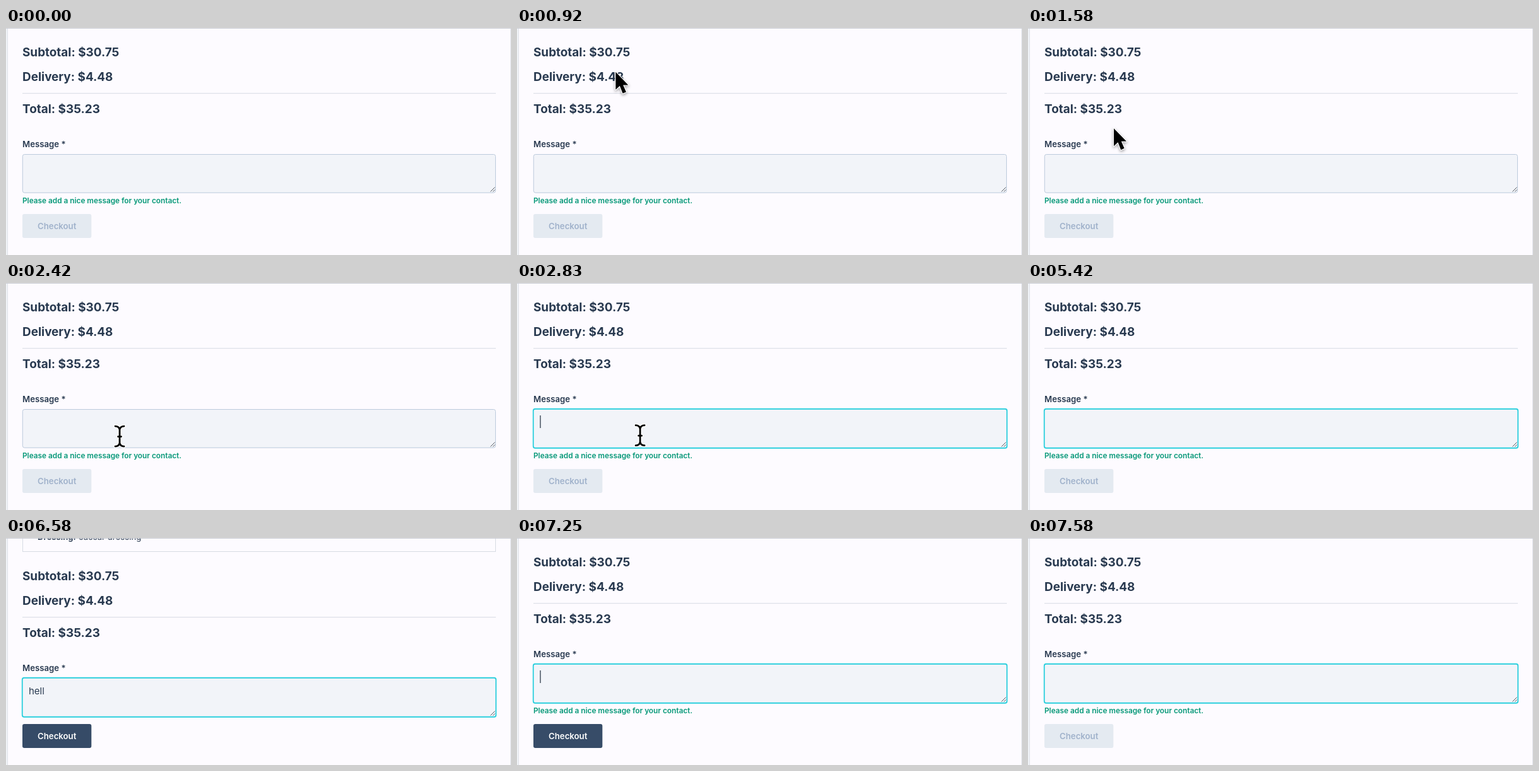
These frames come from a looping animation (800x360 px, 8000 ms). An HTML page:

```html
<!DOCTYPE html>
<html lang="en">
<head>
<meta charset="utf-8">
<title>Checkout form</title>
<style>
html, body { margin: 0; width: 100%; height: 100%; overflow: hidden; background: #fdfbff; }
svg { display: block; width: 800px; height: 360px; font-family: Inter, "Open Sans", sans-serif; }
text { fill: #293a50; font-weight: 600; font-size: 13.2px; }
.sum { font-size: 18.9px; font-weight: 700; }
.plain { font-weight: 400; }
.hint { font-size: 11.8px; fill: #069878; }
#typed { font-size: 15px; font-weight: 400; }
.line { stroke: #d7dbe3; fill: none; }
#ibeam path { fill: none; stroke: #000; stroke-width: 2.8; stroke-linecap: round; stroke-linejoin: round; }
#ibeam .halo { stroke: #fff; stroke-width: 5.4; }
#pointer { filter: drop-shadow(0 2px 2px rgba(0, 0, 0, .35)); }
</style>
</head>
<body>
<svg viewBox="0 0 800 360">
  <rect width="800" height="360" fill="#fdfbff"/>
  <rect width="2" height="360" fill="#f0f3f7"/>
  <path class="line" d="M2.5 0V360M799.5 0V360" stroke-opacity=".8"/>

  <g id="page">
    <rect class="line" x="26.5" y="-60.5" width="749" height="60"/>
    <text x="50" y="-19">Dressing:</text>
    <text class="plain" x="115" y="-19">caesar dressing</text>
    <text class="sum" x="26" y="45">Subtotal: $30.75</text>
    <text class="sum" x="26" y="83.5">Delivery: $4.48</text>
    <path class="line" d="M26 103.7H776"/>
    <text class="sum" x="26" y="134.5">Total: $35.23</text>
    <text x="26" y="189.2">Message *</text>
    <rect id="box" rx="3" fill="#f2f4f9"/>
    <path d="M767.5 259.5L774.5 252.5M771.5 259.5L774.5 256.5" stroke="#555b66"/>
    <text id="typed" x="36" y="226"></text>
    <rect id="caret" y="210" width="1.2" height="20" fill="#1e2b3c"/>
  </g>

  <text class="hint" id="hint" x="26" y="278">Please add a nice message for your contact.</text>
  <rect id="button" x="26" y="295" width="109.3" height="38" rx="3"/>
  <text id="label" x="80.7" y="318.8" text-anchor="middle">Checkout</text>
  <path d="M0 .5H800" stroke="#cbced5"/>

  <g id="cursor">
    <path id="pointer" d="M0 0V28L6.5 22L11.2 34L16.6 31.6L11.8 20.6H20Z"
      fill="#000" stroke="#fff" stroke-width="2.4" paint-order="stroke" stroke-linejoin="round"/>
    <g id="ibeam"></g>
  </g>
</svg>
<script>
const LOOP = 8000, FOCUS = 2670, FILL = 5580, CLEAR = 7250, FADE = 200;
const $ = id => document.getElementById(id);
const set = (el, attrs) => { for (const k in attrs) el.setAttribute(k, attrs[k]); };
const clamp = v => Math.max(0, Math.min(1, v));

const beam = "M-7-16Q-1-16 0-10.5Q1-16 7-16M-7 16Q-1 16 0 10.5Q1 16 7 16M0-10.5V10.5M-2.5 .5H2.5";
$("ibeam").innerHTML = `<path class="halo" d="${beam}"/><path d="${beam}"/>`;

// time, x, y
const route = [
  [80, 96, 150], [830, 150, 88], [1170, 166, 26], [1580, 136, 159],
  [2000, 154, 214], [2420, 180, 243], [2750, 180, 243], [3200, 300, 232],
  [3670, 458, 215], [4100, 490, 214]
];
const edits = [
  [FILL, "h"], [5750, "he"], [5920, "hel"], [6080, "hell"],
  [6750, "hel"], [6920, "he"], [7080, "h"], [CLEAR, ""]
];
const blinks = [[FOCUS, 3170], [3670, 4170], [4670, 5170], [FILL, 6580], [7080, 7580]];

function slope(i, k) {
  const a = route[i - 1], b = route[i + 1];
  return a && b ? (b[k] - a[k]) / (b[0] - a[0]) : 0;
}

function along(t, k) {
  let i = 0;
  while (i < route.length - 2 && t >= route[i + 1][0]) i++;
  const a = route[i], b = route[i + 1], span = b[0] - a[0];
  const u = clamp((t - a[0]) / span), v = 1 - u;
  return a[k] * v * v * (1 + 2 * u) + b[k] * u * u * (3 - 2 * u)
    + span * u * v * (v * slope(i, k) - u * slope(i + 1, k));
}

function mix(from, to, p) {
  return `rgb(${from.map((c, i) => Math.round(c + (to[i] - c) * p))})`;
}

function draw(t) {
  const filled = t >= FILL && t < CLEAR;
  const text = edits.reduce((s, [at, value]) => t >= at ? value : s, "");
  const typed = $("typed");
  if (typed.textContent !== text) typed.textContent = text;
  set($("page"), { transform: `translate(0 ${filled ? 22 : 0})` });
  set($("hint"), { visibility: filled ? "hidden" : "visible" });

  set($("box"), t >= FOCUS
    ? { x: 25.75, y: 199.75, width: 750.5, height: 62, stroke: "#2bcfdd", "stroke-width": 1.8 }
    : { x: 26.3, y: 200.5, width: 749.2, height: 60.7, stroke: "#bccadc", "stroke-width": 1 });

  const on = blinks.some(([a, b]) => t >= a && t < b);
  const width = text ? typed.getComputedTextLength() : 0;
  set($("caret"), { x: 36.4 + width, visibility: on ? "visible" : "hidden" });

  const p = clamp((t - FILL) / FADE) * (1 - clamp((t - CLEAR) / FADE));
  set($("button"), { fill: mix([228, 234, 241], [54, 75, 103], p) });
  $("label").style.fill = mix([160, 178, 203], [255, 255, 255], p);

  const x = along(t, 1), y = along(t, 2);
  const inside = x > 26 && x < 776 && y > 200 && y < 262;
  set($("cursor"), {
    transform: `translate(${x} ${y})`,
    opacity: clamp((t - 80) / 160) * clamp((4150 - t) / 200)
  });
  set($("pointer"), { visibility: inside ? "hidden" : "visible" });
  set($("ibeam"), { visibility: inside ? "visible" : "hidden" });
}

function tick() {
  draw(performance.now() % LOOP);
  requestAnimationFrame(tick);
}
tick();
</script>
</body>
</html>
```
